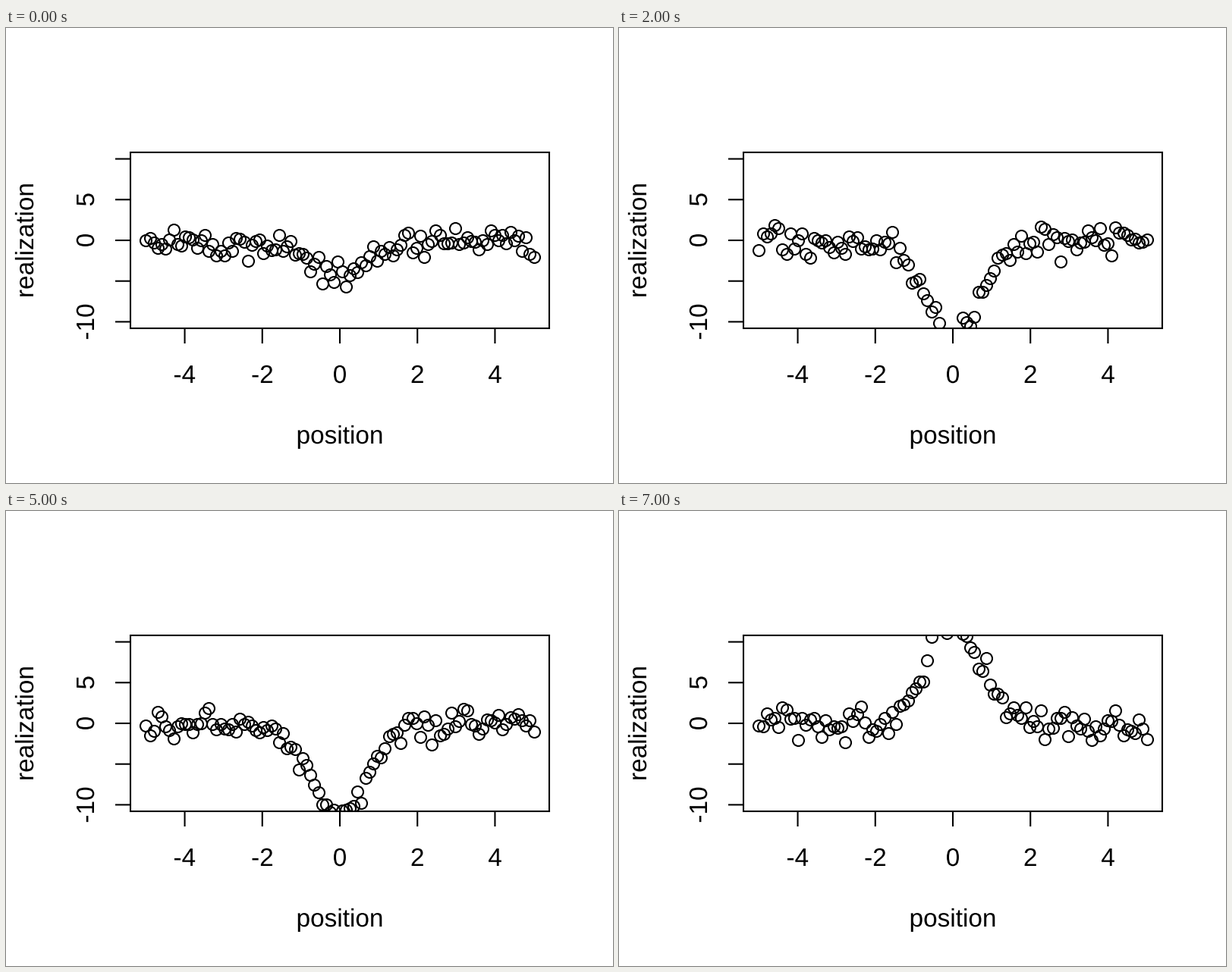
Animation, 800 px wide and 600 px high, one loop 8000 ms. Source, as a matplotlib script:

```python
import matplotlib.pyplot as plt
import numpy as np
from matplotlib.animation import FuncAnimation
from matplotlib.patches import PathPatch, Rectangle
from matplotlib.textpath import TextPath
from matplotlib.transforms import Affine2D

W, H, DPI = 800, 600, 200
LEFT, RIGHT, TOP, BOTTOM = 164, 716, 164, 396
X_MAX, Y_MAX = 5.4, 10.8
TICK = 20
LINE = 0.75  # points
FONT_PX = 12 * DPI / 72
N = 100

# One random bump height per second, each with fresh unit noise.
HEIGHTS = [-4.6, -0.3, -11.5, -6.4, 1.2, -11.0, -1.4, 12.0]

x = np.linspace(-5, 5, N)
noise = np.random.default_rng(7).normal(0, 1, (len(HEIGHTS), N))


def to_px(x_val, y_val):
    return (LEFT + (x_val + X_MAX) / (2 * X_MAX) * (RIGHT - LEFT),
            BOTTOM - (y_val + Y_MAX) / (2 * Y_MAX) * (BOTTOM - TOP))


def realization(k):
    return HEIGHTS[k] * np.exp(-x**2) + noise[k]


fig = plt.figure(figsize=(W / DPI, H / DPI), dpi=DPI, facecolor="white")
ax = fig.add_axes([0, 0, 1, 1])
ax.set(xlim=(0, W), ylim=(H, 0))
ax.axis("off")


def label(px, py, text, vertical=False):
    """Text centred at (px, py) along its baseline."""
    glyphs = TextPath((0, 0), text, size=FONT_PX,
                      prop={"family": "Liberation Sans"})
    box = glyphs.get_extents()
    move = Affine2D().translate(-(box.x0 + box.x1) / 2, 0).scale(1, -1)
    if vertical:
        move.rotate_deg(-90)
    move.translate(px, py)
    ax.add_patch(PathPatch(move.transform_path(glyphs), fc="black", lw=0))


def tick(x0, y0, dx, dy):
    ax.plot([x0, x0 + dx], [y0, y0 + dy], color="black", lw=LINE,
            solid_capstyle="butt", snap=False)


for v in range(-4, 5, 2):
    px, _ = to_px(v, 0)
    tick(px, BOTTOM, 0, TICK)
    label(px, 468, str(v))
for v in range(-10, 11, 5):
    _, py = to_px(0, v)
    tick(LEFT, py, -TICK, 0)
    if v in (-10, 0, 5):
        label(116, py, str(v), vertical=True)
label(440, 548, "position")
label(36, 280, "realization", vertical=True)

frame = Rectangle((LEFT, TOP), RIGHT - LEFT, BOTTOM - TOP,
                  fill=False, ec="black", lw=LINE, zorder=3)
ax.add_patch(frame)

points, = ax.plot([], [], "o", ms=15 * 72 / DPI, mfc="none", mec="black",
                  mew=LINE, snap=False)
points.set_clip_path(frame)


def update(k):
    points.set_data(*to_px(x, realization(k)))
    return points,


anim = FuncAnimation(fig, update, frames=len(HEIGHTS), interval=1000,
                     repeat=True, repeat_delay=0)
plt.show()
```
